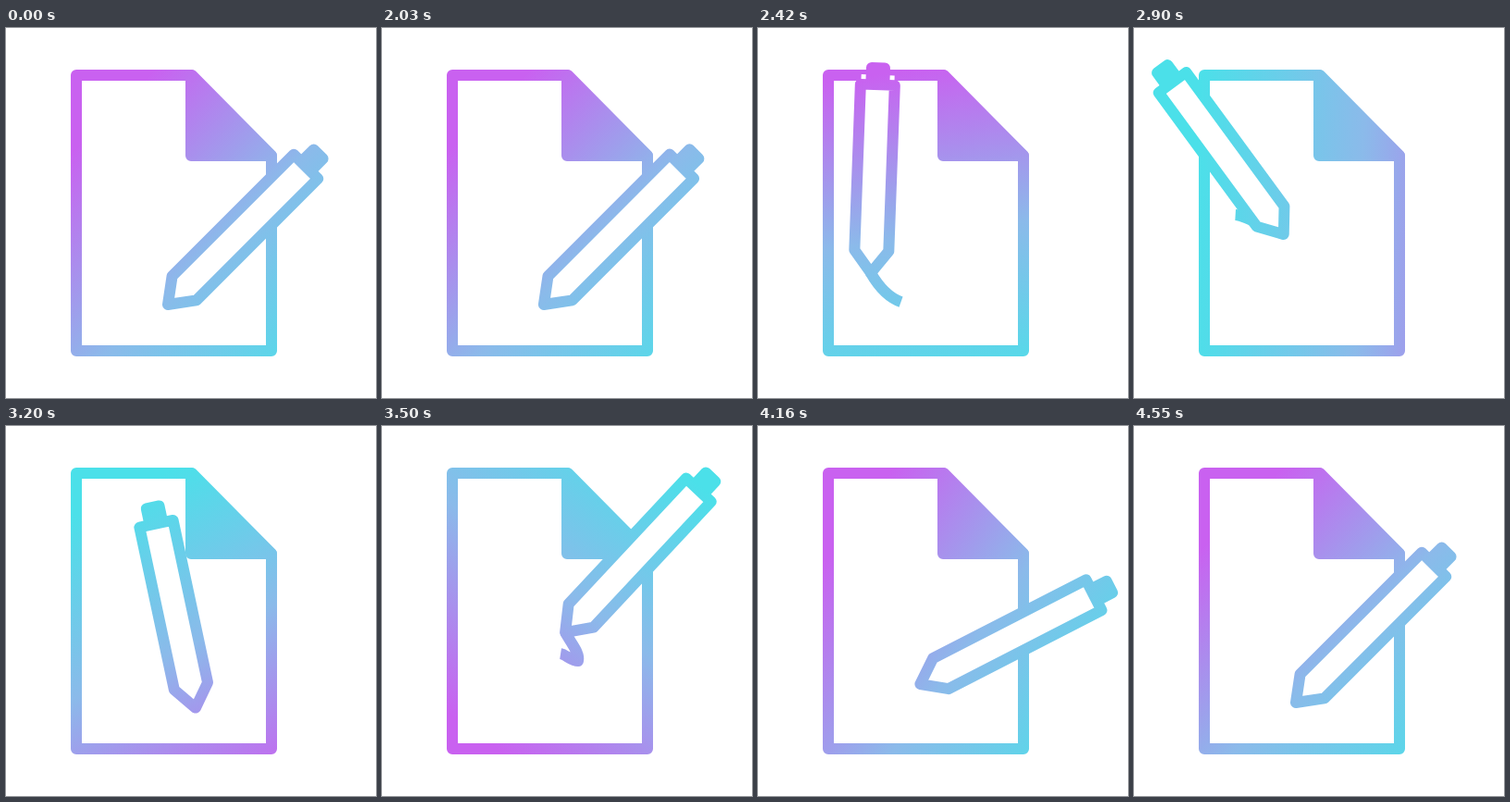
An HTML page without scripts that plays this animation: 400 px wide and 400 px high, repeating every 4.58 s.

```html
<!DOCTYPE html>
<html lang="en">
<head>
<meta charset="utf-8">
<title>Writing pen</title>
<style>
  /* tip position and trail length are percentages of the track */
  @property --tip { syntax: "<number>"; inherits: true; initial-value: 0; }
  @property --trail { syntax: "<number>"; inherits: true; initial-value: 0; }
  @property --lean { syntax: "<angle>"; inherits: true; initial-value: 45deg; }
  @property --spin { syntax: "<angle>"; inherits: true; initial-value: 45deg; }
  @property --stretch { syntax: "<number>"; inherits: true; initial-value: 1; }

  html, body { margin: 0; width: 100%; height: 100%; overflow: hidden; background: #fff; }
  svg {
    --track: path("M175 299C158 299 140 296 122 265C114 245 100 222 109 202C118 202 140 214 164 224C185 233 205 265 205 308C205 290 175 250 192 246C198 246 204 254 212 254C214 245 205 236 198 223C190 208 175 198 169 187C169 205 169 208 173 210C180 214 175 260 175 299");
    display: block; width: 100vw; height: 100vh;
    animation: write 4.58s linear infinite;
  }
  .ink { stroke: #fff; stroke-width: 12; stroke-linejoin: round; }
  .trail {
    d: var(--track);
    fill: none;
    stroke-dasharray: calc(var(--trail) * 1px) 999px;
    stroke-dashoffset: calc((var(--trail) - var(--tip)) * 1px);
  }
  .pen {
    offset-path: var(--track);
    offset-distance: calc(var(--tip) * 1%);
    offset-rotate: var(--lean);
    transform: scaleY(var(--stretch));
  }
  .sheet { transform-origin: 245px 215px; transform: rotate(var(--spin)); }

  @keyframes write {
    0%, 44.3% { --tip: 0; --trail: 0; --lean: 45deg; --spin: 45deg; --stretch: 1;
      animation-timing-function: cubic-bezier(.5, .1, .8, .7); }
    52.8% { --tip: 11.5; --trail: 8; --lean: 2.3deg; --spin: 81deg; --stretch: .965; }
    63.3% { --tip: 33; --trail: 9.8; --lean: -36.3deg; --spin: 182deg; --stretch: .965;
      animation-timing-function: cubic-bezier(.5, .2, .8, .7); }
    69.9% { --tip: 50; --trail: 9.6; --lean: -12deg; --spin: 245deg; --stretch: .965; }
    76.4% { --tip: 72; --trail: 9.6; --lean: 43deg; --spin: 307deg; --stretch: 1; }
    84.9% { --tip: 84.4; --trail: 4.2; --lean: 61deg; --spin: 368deg; --stretch: 1; }
    90.8% { --tip: 96.5; --trail: 0; --lean: 63deg; --spin: 396deg; --stretch: 1;
      animation-timing-function: cubic-bezier(.3, .5, .5, 1); }
    99.3%, 100% { --tip: 100; --trail: 0; --lean: 45deg; --spin: 405deg; --stretch: 1; }
  }
</style>
</head>
<body>
<svg viewBox="0 0 400 400">
  <defs>
    <linearGradient id="tint" gradientUnits="userSpaceOnUse" x1="65" y1="0" x2="425" y2="0">
      <stop offset="0" stop-color="#c961f0"/>
      <stop offset=".5" stop-color="#8bbaea"/>
      <stop offset="1" stop-color="#4be0e9"/>
    </linearGradient>

    <!-- Everything is cut from one gradient sheet: white shows, black hides -->
    <mask id="drawing" maskUnits="userSpaceOnUse" x="0" y="0" width="400" height="400">
      <path class="ink" fill="none" d="M76 51H201L287 138V349H76Z"/>
      <path class="ink" fill="#fff" d="M200 51V138H287Z"/>
      <path class="ink trail" pathLength="100"/>
      <g class="pen">
        <rect x="-18" y="-222" width="36" height="8"/>
        <path class="ink" fill="#000" d="M0 0L-18.5-25V-211H18.5V-25Z"/>
        <rect x="-13" y="-236" width="26" height="26" rx="6" fill="#fff"/>
      </g>
    </mask>
  </defs>
  <g mask="url(#drawing)">
    <rect class="sheet" x="-255" y="-285" width="1000" height="1000" fill="url(#tint)"/>
  </g>
</svg>
</body>
</html>
```
